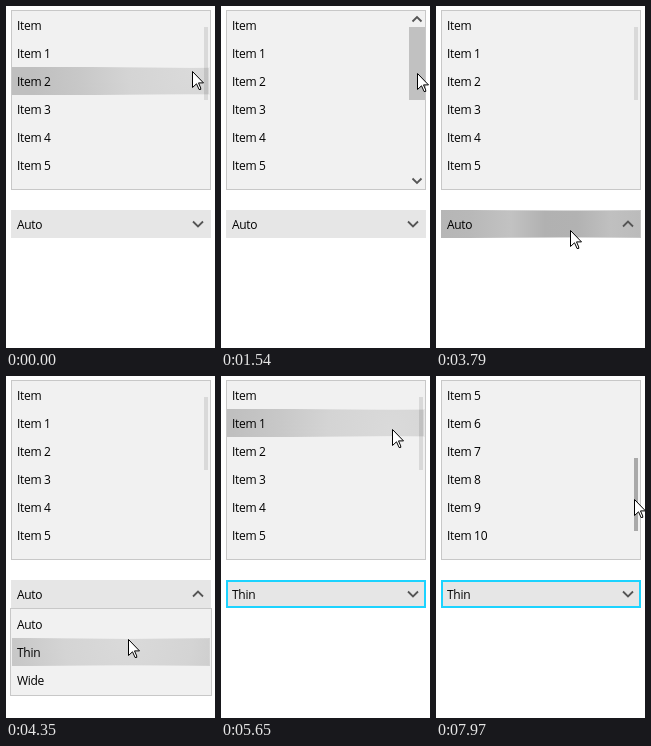
These frames come from a looping animation (209 by 342 pixels, 8 s). An HTML page:

```html
<!DOCTYPE html>
<html lang="en">
<head>
<meta charset="utf-8">
<title>Scroll bar modes</title>
<style>
html, body { margin: 0; width: 100%; height: 100%; overflow: hidden; background: #fff; }
svg { display: block; }
text { font: 12px "Open Sans", "Noto Sans", sans-serif; letter-spacing: -.3px; fill: #000; }
.chevron { fill: none; stroke: #555; stroke-width: 1.8; }
.frame { fill: #f1f1f1; stroke: #c8c8c8; }
</style>
</head>
<body>
<svg width="209" height="342" viewBox="0 0 209 342">
  <defs>
    <radialGradient id="itemGlow" gradientUnits="userSpaceOnUse" r="160">
      <stop offset="0" stop-color="#dadada"/><stop offset=".4" stop-color="#d4d4d4"/>
      <stop offset=".7" stop-color="#c8c8c8"/><stop offset="1" stop-color="#bfbfbf"/>
    </radialGradient>
    <radialGradient id="boxGlow" gradientUnits="userSpaceOnUse" r="160">
      <stop offset="0" stop-color="#dfdfdf"/><stop offset=".4" stop-color="#dadada"/>
      <stop offset="1" stop-color="#c8c8c8"/>
    </radialGradient>
    <radialGradient id="edgeGlow" gradientUnits="userSpaceOnUse" r="100">
      <stop offset="0" stop-color="#fff" stop-opacity=".6"/><stop offset="1" stop-color="#fff" stop-opacity="0"/>
    </radialGradient>
    <linearGradient id="press" gradientUnits="userSpaceOnUse" x1="5" x2="205">
      <stop offset="0" stop-color="#b6b6b6"/><stop offset=".14" stop-color="#b8b8b8"/>
      <stop offset=".35" stop-color="#c2c2c2"/><stop offset=".52" stop-color="#b1b1b1"/>
      <stop offset=".68" stop-color="#b2b2b2"/><stop offset=".85" stop-color="#c0c0c0"/>
      <stop offset="1" stop-color="#bbb"/>
    </linearGradient>
    <clipPath id="drop"><rect id="dropClip" x="4" y="232" width="202" height="88"/></clipPath>
  </defs>

  <rect class="frame" x="5.5" y="4.5" width="199" height="179"/>
  <g id="listHover">
    <rect x="6" width="198" height="28" fill="url(#itemGlow)"/>
    <rect x="6.5" width="197" height="27" fill="none" stroke="url(#edgeGlow)"/>
  </g>
  <g id="items"></g>
  <rect id="thumb"/>
  <g id="arrows" class="chevron">
    <path d="M191.5 15.5l4.5-4.5 4.5 4.5"/><path d="M191.5 172.5l4.5 4.5 4.5-4.5"/>
  </g>

  <rect id="combo" x="5" y="204" width="200" height="28"/>
  <rect id="comboEdge" x="5.5" y="204.5" width="199" height="27" fill="none" stroke="url(#edgeGlow)"/>
  <rect id="focus" x="6" y="205" width="198" height="26" fill="none" stroke="#1cd3ff" stroke-width="2"/>
  <text id="mode" x="11" y="223"></text>
  <path id="chevron" class="chevron"/>

  <g id="popup" clip-path="url(#drop)">
    <rect class="frame" x="4.5" y="232.5" width="201" height="87"/>
    <g id="popHover">
      <rect x="6" width="198" height="28" fill="url(#itemGlow)"/>
      <rect x="6.5" width="197" height="27" fill="none" stroke="url(#edgeGlow)"/>
    </g>
    <text x="11" y="253">Auto</text><text x="11" y="281">Thin</text><text x="11" y="309">Wide</text>
  </g>

  <path id="cursor" d="M.5 .5V16.5l4-3.7 2.6 5.7h1.6v-1.6l-2.2-5h5z" fill="#fff" stroke="#000"/>
</svg>
<script>
const LOOP = 8000, ROW = 28, NOTCH = 73 / 6;
const $ = id => document.getElementById(id);
const set = (el, attrs) => { for (const k in attrs) el.setAttribute(k, attrs[k]); };
const show = (id, on) => { $(id).style.display = on ? '' : 'none'; };

// Each move: start, end, steps, then key points [x, y, scroll bar glow]
const home = [186, 65, 0];
const moves = [
  [80, 160, 2, [198, 66, 1]],
  [620, 930, 5, [177, 70, 0]],
  [1160, 1540, 6, [196, 67, 1]],
  [2180, 2700, 8, [199, 147, 1]],
  [2870, 3560, 10, [196, 66, 1], [134, 224, 0]],
  [4180, 4410, 4, [118, 276, 0]],
  [4880, 5270, 6, [114, 226, 0], [136, 100, 0], [150, 49, 0]],
  [5500, 6130, 9, [198, 57, 0], [199, 58, 1]],
  [6420, 6650, 4, [174, 43, 0]],
  [6820, 7050, 4, [198, 62, 1]],
  [7430, 7970, 8, [198, 123, 1]]
];

function pose(t) {
  let at = home;
  for (const [start, end, steps, ...stops] of moves) {
    if (t < start) break;
    const pts = [at, ...stops];
    const step = Math.min(steps, Math.floor((t - start) / (end - start) * (steps - 1) + 1e-6) + 1);
    const u = step / steps * stops.length;
    const i = Math.min(stops.length - 1, Math.floor(u));
    at = pts[i].map((v, k) => v + (pts[i + 1][k] - v) * (u - i));
  }
  return at;
}

const rows = Array.from({ length: 6 }, (_, i) => {
  const row = document.createElementNS('http://www.w3.org/2000/svg', 'text');
  set(row, { x: 11, y: 24 + ROW * i });
  $('items').append(row);
  return row;
});

function hoverRow(id, on, top, y) {
  show(id, on);
  if (!on) return;
  const rowY = top + ROW * Math.floor((y - top) / ROW);
  const [fill, edge] = $(id).children;
  set(fill, { y: rowY });
  set(edge, { y: rowY + .5 });
}

function draw(t) {
  const [px, py, glow] = pose(t);
  const x = Math.round(px), y = Math.round(py), lit = glow * glow;
  const thin = t >= 4660;
  const wide = thin ? 0 : lit;
  const drag = (t >= 2180 && t < 3176) || t >= 7430;
  const open = t >= 3790 && t < 4660;
  const pressed = open && t < 3870;

  for (const id of ['itemGlow', 'boxGlow', 'edgeGlow']) set($(id), { cx: x, cy: y });
  set($('cursor'), { transform: `translate(${x} ${y})` });

  const grab = thin ? 62 : 67;
  const offset = drag ? Math.max(0, Math.min(6, Math.round((y - grab) / NOTCH))) : 0;
  rows.forEach((row, i) => {
    const n = i + offset;
    row.textContent = n ? 'Item ' + n : 'Item';
  });
  hoverRow('listHover', !drag && x < 188 && y >= 5 && y < 173, 5, y);

  set($('thumb'), {
    x: 198 - 10 * wide, y: 21 + Math.round(offset * NOTCH),
    width: 4 + 12 * wide, height: 73,
    'fill-opacity': drag ? .3 : .1 + .1 * lit
  });
  set($('arrows'), { opacity: wide });

  const over = y >= 204 && y < 232;
  set($('combo'), { fill: pressed ? 'url(#press)' : over ? 'url(#boxGlow)' : '#e6e6e6' });
  show('comboEdge', over);
  show('focus', t >= 2180 && !over && !open);
  $('mode').textContent = thin ? 'Thin' : 'Auto';
  set($('chevron'), { d: open ? 'M187 220.5l5-5 5 5' : 'M187 215.5l5 5 5-5' });

  show('popup', open && !pressed);
  set($('dropClip'), { height: t < 3950 ? 48 : 88 });
  hoverRow('popHover', open && y >= 234 && y < 318, 234, y);
}

function tick() {
  draw(performance.now() % LOOP);
  requestAnimationFrame(tick);
}
tick();
</script>
</body>
</html>
```
